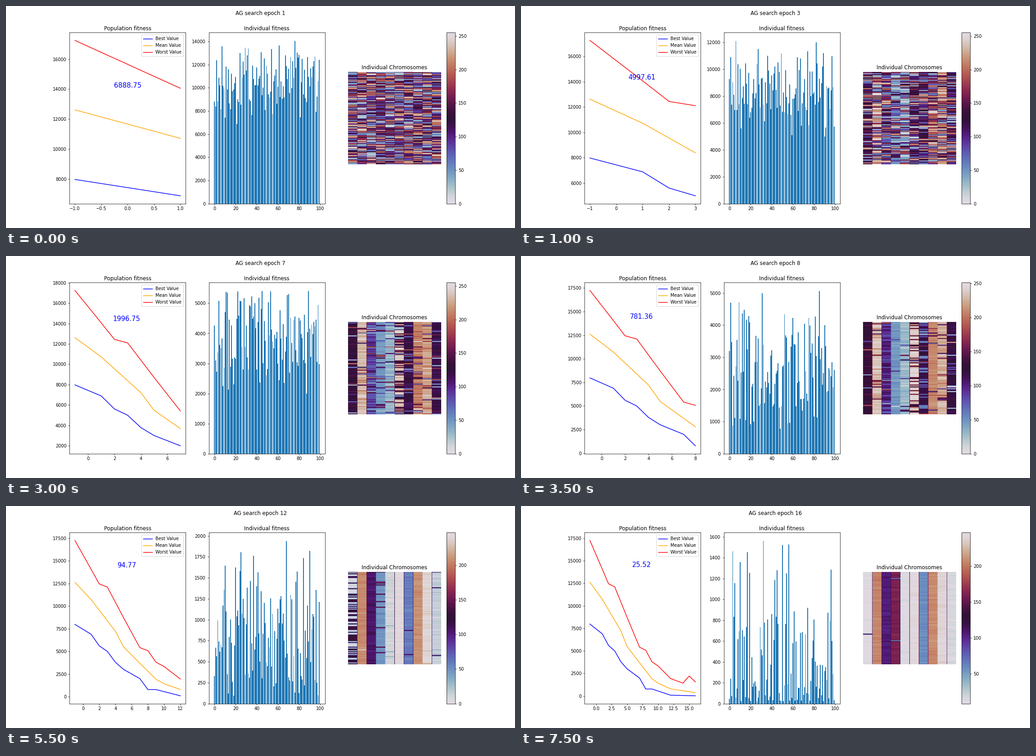
Recreate the animation shown at these times as a matplotlib script. Size 1131x495 px, loop 8 s.

```python
import numpy as np
import matplotlib.pyplot as plt
from matplotlib.animation import FuncAnimation

W = 1131
EPOCHS = 16
XS = np.array([-1, *range(1, EPOCHS + 1)])


def curve(points):
    """Value per epoch, straight between the (epoch: value) key points."""
    return np.interp(XS, list(points), list(points.values()))


BEST = curve({-1: 7980, 1: 6888.75, 2: 5611.38, 3: 4997.61, 4: 3790.42, 5: 3009.76,
              7: 1996.75, 8: 781.36, 9: 781.36, 10: 554.52, 12: 94.77, 16: 25.52})
MEAN = curve({-1: 12620, 1: 10720, 4: 7220, 5: 5490, 7: 3690, 9: 1920,
              10: 1420, 12: 800, 16: 370})
WORST = curve({-1: 17250, 1: 14059, 2: 12440, 3: 12100, 5: 8715, 7: 5417, 8: 5075,
               9: 3800, 10: 3325, 12: 1942, 14: 1430, 15: 2220, 16: 1563})

# Per gene: early value, final value, and the epoch when half have switched.
START = np.array([130, 235, 78, 47, 30, 130, 120, 190, 222, 120])
FINAL = np.array([10, 206, 105, 160, 11, 243, 58, 208, 240, 15])
SWITCH = np.array([12, 9.5, 7.5, 13.5, 10, 7, 8.5, 5, 9, 9.5])


def fitness(n):
    rng = np.random.default_rng(100 + n)
    mu = (MEAN[n] - BEST[n]) / (WORST[n] - BEST[n])
    k = 7 - 0.3 * n
    share = rng.beta(mu * k, (1 - mu) * k, 100)
    share = (share - share.min()) / np.ptp(share)
    return BEST[n] + (WORST[n] - BEST[n]) * share


def chromosomes(n, vmin, vmax):
    rng = np.random.default_rng(300 + n)
    size = (100, len(START))
    switched = rng.random(size) < 1 / (1 + np.exp(1.5 * (SWITCH - n)))
    genes = np.where(switched, FINAL, START)
    genes = genes + rng.normal(0, 3 + 60 * np.exp(-n / 2.5), size)
    mutated = rng.random(size) < max(0, 1 - (n - 1) / 11) ** 2.2
    genes = np.where(mutated, rng.uniform(0, 255, size), genes)
    return np.clip(genes, vmin, vmax).repeat(10, axis=1)


fig, (ax_pop, ax_ind, ax_chr) = plt.subplots(1, 3, figsize=(16, 7.003), dpi=W / 16)
title = fig.suptitle("")

ax_pop.set_title("Population fitness")
curves = [(ax_pop.plot([], [], color=color, label=label)[0], data)
          for label, color, data in (("Best Value", "blue", BEST),
                                     ("Mean Value", "orange", MEAN),
                                     ("Worst Value", "red", WORST))]
ax_pop.legend(loc="upper right")
note = ax_pop.annotate("", (0, 0), xytext=(0, 10), textcoords="offset points",
                       ha="center", color="blue", fontsize=15)

ax_ind.set_title("Individual fitness")
bars = ax_ind.bar(range(100), np.ones(100))

ax_chr.set_title("Individual Chromosomes")
ax_chr.axis("off")
image = ax_chr.imshow(np.zeros((100, 100)), cmap="twilight", vmin=0, vmax=255)
fig.colorbar(image, ax=ax_chr)


def draw(frame):
    n = frame + 1
    title.set_text(f"AG search epoch {n}")

    for line, data in curves:
        line.set_data(XS[:n + 1], data[:n + 1])
    ax_pop.relim()
    ax_pop.autoscale_view()
    note.set_text(f"{BEST[n]:.2f}")
    note.xy = ((n - 1) / 2.05, 0.8 * WORST[0])

    for bar, v in zip(bars, fitness(n)):
        bar.set_height(v)
    ax_ind.set_ylim(0, 1.05 * WORST[n])

    vmin, vmax = max(0, 2 * (n - 12)), np.interp(n, [7, 9], [255, 247])
    image.set_data(chromosomes(n, vmin, vmax))
    image.set_clim(vmin, vmax)


anim = FuncAnimation(fig, draw, frames=EPOCHS, interval=500, repeat=True)
plt.show()
```
